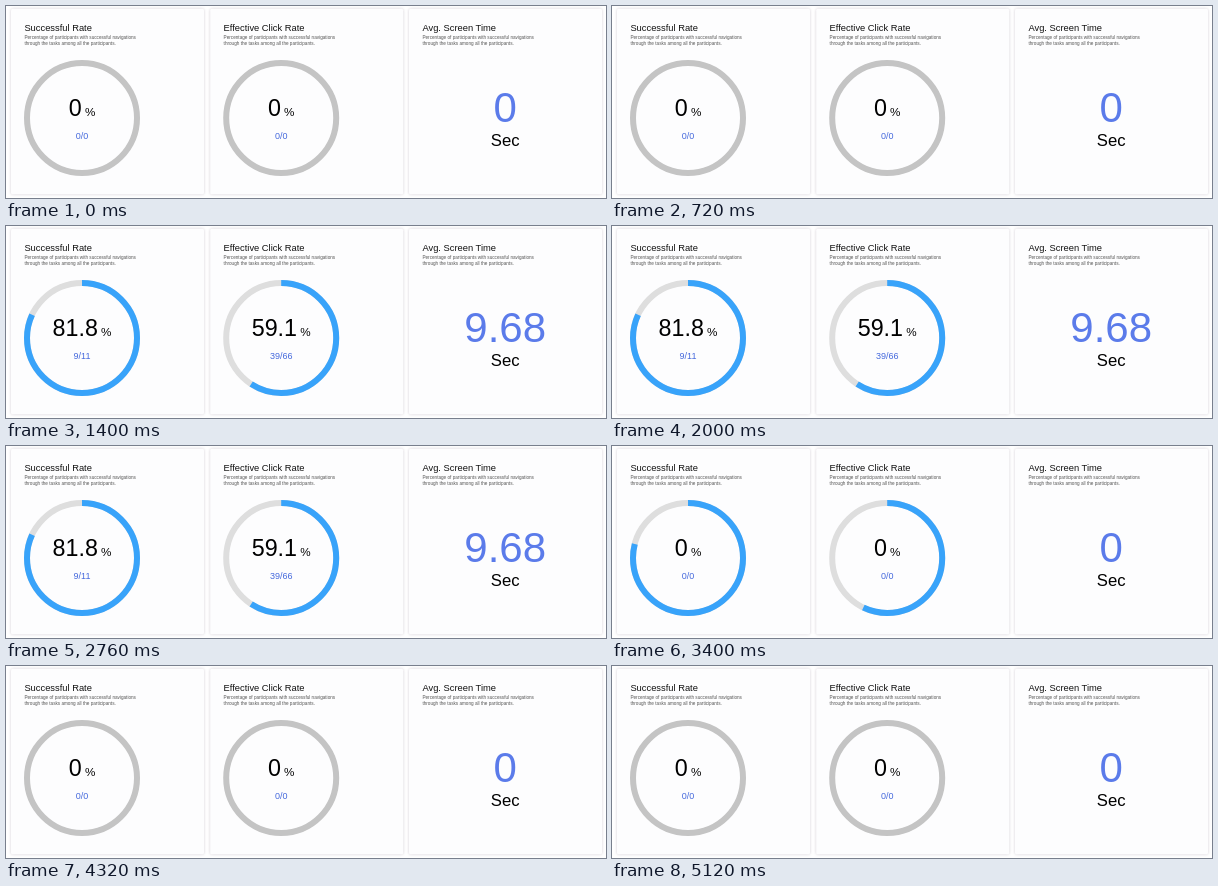
An HTML page for the animation above (5920 ms loop, 600x192 px).

```html
<!DOCTYPE html>
<html lang="en">
<head>
<meta charset="utf-8">
<title>Task metrics</title>
<style>
  html, body { margin: 0; width: 100%; height: 100%; overflow: hidden; background: #fff; }
  svg { display: block; width: 600px; height: 192px; font-family: "Liberation Sans", Arial, sans-serif; }
  .card { fill: #fdfdfe; filter: drop-shadow(0 0 1.5px rgba(70, 45, 80, .24)); }
  .title { font-size: 9.35px; fill: #111; }
  .note { font-size: 4.67px; fill: #555; }
  .mid { text-anchor: middle; }
  .value { font-size: 23.3px; }
  .unit { font-size: 11.7px; }
  .count { font-size: 9px; fill: #4468dc; }
  .time { font-size: 42px; fill: #5b7bea; }
  .sec { font-size: 16.7px; }
  .ring { fill: none; stroke-width: 6; }
</style>
</head>
<body>
<svg id="stage" viewBox="0 0 600 192"></svg>
<script>
const LOOP = 5920, SHOW = 750, HIDE = 3370, SPAN = 600;
const R = 55, ROUND = 2 * Math.PI * R;
const stage = document.getElementById('stage');

function add(tag, attrs, text = '', parent = stage) {
  const el = document.createElementNS('http://www.w3.org/2000/svg', tag);
  for (const key in attrs) el.setAttribute(key, attrs[key]);
  el.textContent = text;
  return parent.appendChild(el);
}

function label(cls, x, y, text) {
  return add('text', { class: cls, x, y }, text);
}

function card(x, title) {
  add('rect', { class: 'card', x, y: 2.8, width: 193, height: 185.4, rx: 1.5 });
  label('title', x + 13.4, 24.6, title);
  label('note', x + 13.4, 33.4, 'Percentage of participants with successful navigations');
  label('note', x + 13.4, 38.9, 'through the tasks among all the participants.');
}

function gauge(x, title, rate, count) {
  card(x, title);
  const cx = x + 71, cy = 112;
  const track = add('circle', { class: 'ring', cx, cy, r: R });
  const arc = add('circle', {
    class: 'ring', cx, cy, r: R, stroke: '#38a3fa', transform: `rotate(-90 ${cx} ${cy})`
  });
  const line = label('mid', cx, 110.3, '');
  const value = add('tspan', { class: 'value' }, '0', line);
  add('tspan', { class: 'unit' }, '\u00a0%', line);
  const ratio = label('mid count', cx, 132.6, '0/0');

  return (on, grow, grey) => {
    value.textContent = on ? rate.toFixed(1) : '0';
    ratio.textContent = on ? count : '0/0';
    track.setAttribute('stroke', `rgb(${grey},${grey},${grey})`);
    arc.setAttribute('stroke-dasharray', `${ROUND * rate / 100 * grow} ${ROUND}`);
    arc.setAttribute('visibility', grow > 0.001 ? 'visible' : 'hidden');
  };
}

const gauges = [
  gauge(5, 'Successful Rate', 81.8, '9/11'),
  gauge(204.2, 'Effective Click Rate', 59.1, '39/66')
];
card(403, 'Avg. Screen Time');
const time = label('mid time', 499.2, 116.4, '0');
label('mid sec', 499.2, 139.6, 'Sec');

const clamp = v => Math.min(1, Math.max(0, v));
const bez = (a, b, s) => 3 * a * s * (1 - s) ** 2 + 3 * b * s * s * (1 - s) + s ** 3;

// cubic-bezier(.25, .1, .25, 1), solved by bisection
function ease(p) {
  if (p <= 0 || p >= 1) return clamp(p);
  let lo = 0, hi = 1;
  for (let i = 0; i < 24; i++) {
    const s = (lo + hi) / 2;
    if (bez(.25, .25, s) < p) lo = s; else hi = s;
  }
  return bez(.1, 1, lo);
}

function draw(t) {
  const on = t >= SHOW && t < HIDE;
  const grow = ease((t - SHOW) / SPAN) - ease((t - HIDE) / SPAN);
  const light = clamp((t - SHOW) / 160) - clamp((t - HIDE - SPAN) / 200);
  const grey = Math.round(196 + 26 * light);
  for (const update of gauges) update(on, grow, grey);
  time.textContent = on ? '9.68' : '0';
}

function tick() {
  draw(performance.now() % LOOP);
  requestAnimationFrame(tick);
}
tick();
</script>
</body>
</html>
```
